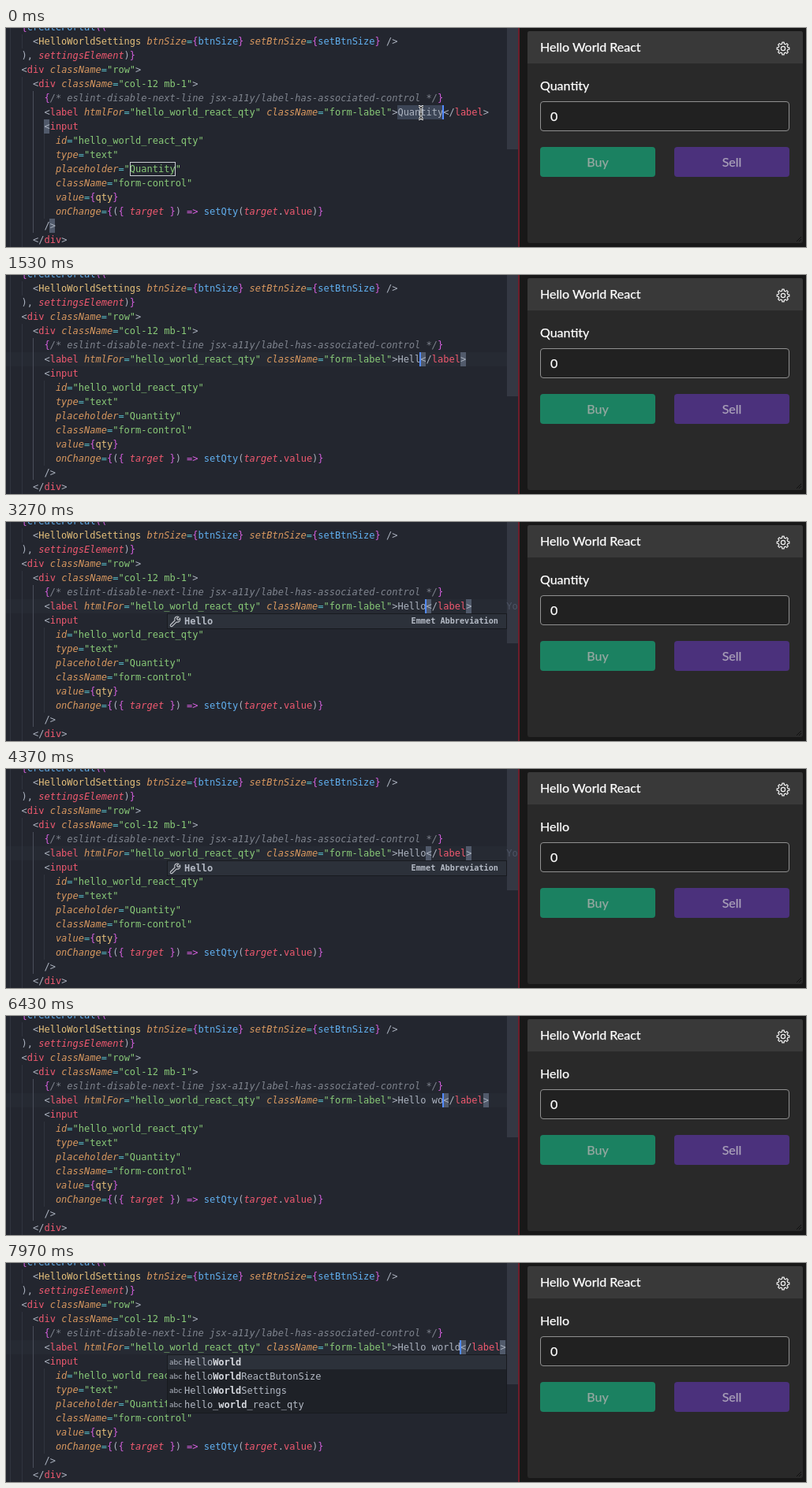
Animation of 1014x278 px, one loop 8000 ms. Source, as an HTML page:

```html
<!DOCTYPE html>
<html lang="en">
<head>
<meta charset="utf-8">
<title>Live label editing</title>
<style>
  html, body { margin: 0; width: 100%; height: 100%; overflow: hidden; background: #181818; }
  #stage { position: relative; width: 1014px; height: 278px; overflow: hidden; }
  #stage div, #stage svg { position: absolute; box-sizing: border-box; }
  #editor { left: 0; top: 0; width: 649px; height: 278px; overflow: hidden; background: #23262f;
    font: 12px/18px "DejaVu Sans Mono", monospace; color: #abb2bf; }
  .row { white-space: pre; height: 18px; }
  .guide { width: 1px; background: #30343f; }
  .guide.on { background: #4a4f5b; }
  #current { left: 0; top: 98px; width: 635px; height: 18px; background: #262a33; }
  .match { width: 7px; height: 18px; background: #515a6b; }
  #select { left: 496px; top: 98px; width: 58px; height: 18px; background: #3c4556; }
  #twin { left: 157px; top: 170px; width: 58px; height: 18px; border: 1px solid #c9ccd2; }
  #caret { top: 98px; width: 2px; height: 18px; background: #528bff; }
  #scroll { left: 635px; top: 0; width: 14px; height: 154px; background: #343843; }
  #ghost { top: 98px; color: #4d5465; }
  .r { color: #ef596f } .g { color: #89ca78 } .b { color: #61afef } .m { color: #d55fde }
  .y { color: #e5c07b } .c { color: #56b6c2 }
  .o { color: #d8985f; font-style: italic } .i { color: #ef596f; font-style: italic }
  .k { color: #7f848e; font-style: italic }
  .popup { left: 204px; top: 116px; width: 431px; background: #1e2127; border: 1px solid #181a1f; color: #b4bac5; }
  .popup .row { left: 0; width: 429px; padding-left: 21px; }
  .popup .row:first-child { background: #2c313a; }
  .popup b { color: #d7dae0; }
  .popup .abc { left: 2px; top: 0; font: 9px/18px "DejaVu Sans", sans-serif; }
  .popup .kind { right: 10px; top: 0; font-size: 10.2px; }
  #edge { left: 649px; top: 0; width: 2px; height: 278px; background: #6d1d2a; }
  #panel { left: 661px; top: 4px; width: 349px; height: 269px; background: #292929; border-radius: 3px; }
  #head { left: 0; top: 0; width: 349px; height: 41px; background: #393939; border-radius: 3px 3px 0 0; }
  #panel .t { font: 16px/24px Lato, sans-serif; color: #fff; white-space: pre; -webkit-text-stroke: .25px; }
  #field { left: 16px; top: 89px; width: 316px; height: 38px; border: 1px solid #909090; border-radius: 4px; background: #212121; }
  #panel .btn { top: 147px; width: 146px; height: 38px; line-height: 38px; border-radius: 4px; text-align: center; }
</style>
</head>
<body>
<div id="stage">
  <div id="editor">
    <div id="current"></div>
    <div id="select"></div>
    <div id="open" class="match"></div>
    <div id="close" class="match"></div>
    <div id="code"></div>
    <div id="twin"></div>
    <div id="scroll"></div>
    <div id="ghost" class="row">You, seconds ago</div>
    <div id="caret"></div>
    <div id="emmet" class="popup"></div>
    <div id="words" class="popup"></div>
    <svg id="beam" style="left:519px;top:98px" width="14" height="19" fill="none">
      <path id="beamPath" d="M4 1.5Q7 1.5 7 4Q7 1.5 10 1.5M7 4V15M4 17.5Q7 17.5 7 15Q7 17.5 10 17.5M5.5 11H8.5" stroke="#fff" stroke-width="2.6"/>
      <use href="#beamPath" style="stroke:#000"/>
      <path d="M4 1.5Q7 1.5 7 4Q7 1.5 10 1.5M7 4V15M4 17.5Q7 17.5 7 15Q7 17.5 10 17.5M5.5 11H8.5" stroke="#111" stroke-width="1"/>
    </svg>
  </div>
  <div id="edge"></div>
  <div id="panel">
    <div id="head"></div>
    <div class="t" style="left:16px;top:8px">Hello World React</div>
    <svg style="left:315px;top:13px" width="18" height="18" fill="none" stroke="#f2f2f2" stroke-width="1.2">
      <path id="gear" stroke-linejoin="round"/>
      <circle cx="9" cy="9" r="2.6"/>
    </svg>
    <div id="label" class="t" style="left:16px;top:57px"></div>
    <div id="field"></div>
    <div class="t" style="left:29px;top:96px">0</div>
    <div class="t btn" style="left:16px;background:#1b8161;color:#95a8a1">Buy</div>
    <div class="t btn" style="left:186px;background:#4b317c;color:#aaa1b9">Sell</div>
    <svg style="left:339px;top:259px" width="9" height="9" stroke="#111" stroke-width="1"><path d="M2 8L8 2M5 8L8 5"/></svg>
  </div>
</div>
<script>
const $ = id => document.getElementById(id);
const CH = 7.224, LOOP = 8000, BLINK = 500;
const TEXT_X = 48.4 + 62 * CH;

// Each run starts with its colour class; runs are separated by "~".
const paint = src => src.split('~').map(run => {
  const span = document.createElement('span');
  span.className = run[0];
  span.textContent = run.slice(1);
  return span;
});

function row(parent, x, y, src) {
  const el = document.createElement('div');
  el.className = 'row';
  el.style.left = x + 'px';
  el.style.top = y + 'px';
  el.append(...paint(src));
  parent.append(el);
  return el;
}

const lines = [
  [1, 'm{~bcreatePortal~m((' ],
  [2, 'w<~yHelloWorldSettings~o btnSize~c=~m{~bbtnSize~m}~o setBtnSize~c=~m{~bsetBtnSize~m}~w />'],
  [1, 'w), ~isettingsElement~w)~m}'],
  [1, 'w<~rdiv~o className~c=~g"row"~w>'],
  [2, 'w<~rdiv~o className~c=~g"col-12 mb-1"~w>'],
  [3, 'm{~k/* eslint-disable-next-line jsx-a11y/label-has-associated-control */~m}'],
  [3, 'w<~rlabel~o htmlFor~c=~g"hello_world_react_qty"~o className~c=~g"form-label"~w>~w~w</~rlabel~w>'],
  [3, 'w<~rinput'],
  [4, 'oid~c=~g"hello_world_react_qty"'],
  [4, 'otype~c=~g"text"'],
  [4, 'oplaceholder~c=~g"Quantity"'],
  [4, 'oclassName~c=~g"form-control"'],
  [4, 'ovalue~c=~m{~yqty~m}'],
  [4, 'oonChange~c=~m{~w(~m{~i target ~m}~w)~m => ~bsetQty~w(~itarget~w.~rvalue~w)~m}'],
  [3, 'w/>'],
  [2, 'w</~rdiv~w>']
];
const rows = lines.map(([depth, src], i) => row($('code'), 5.1 + depth * 2 * CH, i * 18 - 10, src));
const typed = rows[6].children[9];

// Indent guides: x, top, bottom, active
[[5, 0, 278], [20, 8, 26], [20, 62, 278], [34, 80, 260, 1], [48, 134, 242]].forEach(([x, a, b, on]) => {
  const g = document.createElement('div');
  g.className = on ? 'guide on' : 'guide';
  g.style.cssText = `left:${x}px;top:${a}px;height:${b - a}px`;
  $('editor').insertBefore(g, $('code'));
});

$('emmet').style.height = '20px';
row($('emmet'), 0, 0, 'wHello').style.fontWeight = 'bold';
$('emmet').firstChild.insertAdjacentHTML('beforeend', `<div class="kind">Emmet Abbreviation</div>
  <svg style="left:2px;top:2px" width="15" height="15" fill="none" stroke="#c5c8ce" stroke-width="1.1">
  <path d="M1.5 11.5L7 6Q6 2.5 9 1.3Q10.5 .8 11.8 1.4L9.4 3.8L11.2 5.6L13.6 3.2Q14.3 5 13 6.8Q11.4 8.6 9 8L3.5 13.5Q2.3 14 1.5 13.1Q.9 12.3 1.5 11.5Z"/></svg>`);

$('words').style.height = '75px';
[['Hello', 'World', ''], ['hello', 'World', 'ReactButonSize'], ['Hello', 'World', 'Settings'], ['hello_', 'world', '_react_qty']]
  .forEach(([pre, hit, post], i) => {
    row($('words'), 0, i * 18, 'w').innerHTML = `<div class="abc">abc</div>${pre}<b>${hit}</b>${post}`;
  });

// Gear outline with eight teeth
$('gear').setAttribute('d', 'M' + Array.from({ length: 32 }, (_, i) => {
  const k = i % 4, a = ((i >> 2) + [-.3, -.19, .19, .3][k]) * Math.PI / 4;
  const r = k == 1 || k == 2 ? 7.9 : 6;
  return (9 + r * Math.sin(a)).toFixed(2) + ' ' + (9 - r * Math.cos(a)).toFixed(2);
}).join('L') + 'Z');

// Time of each keystroke and the text it leaves
const keys = [
  [0, 'Quantity'], [1080, 'H'], [1230, 'He'], [1370, 'Hel'], [1480, 'Hell'], [1800, 'Hello'],
  [5600, 'Hello '], [6130, 'Hello w'], [6300, 'Hello wo'], [6540, 'Hello wor'],
  [6700, 'Hello worl'], [6850, 'Hello world']
];

const show = (id, on) => { $(id).style.visibility = on ? 'visible' : 'hidden'; };
const place = (id, x, y) => { $(id).style.left = x + 'px'; if (y != null) $(id).style.top = y + 'px'; };
const within = (t, a, b) => t >= a && t < b;

function draw(t) {
  const [since, text] = keys.filter(k => k[0] <= t).pop();
  const idle = since === 0;
  const x = TEXT_X + text.length * CH;
  typed.textContent = text;
  place('caret', Math.round(x) - 1);
  show('caret', Math.floor((t - since) / BLINK) % 2 === 0);
  for (const id of ['select', 'twin', 'beam']) show(id, idle);
  show('current', !idle);
  if (idle) {
    place('open', 48, 116);
    place('close', 55, 242);
  } else {
    place('open', x, 98);
    place('close', x + 7 * CH, 98);
  }
  place('ghost', x + 8 * CH + 44);
  show('ghost', within(t, 2100, 6130));
  show('emmet', within(t, 2000, 5780));
  show('words', t >= 7050);
  $('label').textContent = t < 3900 ? 'Quantity' : 'Hello';
}

const start = performance.now();
function tick() {
  draw((performance.now() - start) % LOOP);
  requestAnimationFrame(tick);
}
tick();
</script>
</body>
</html>
```
